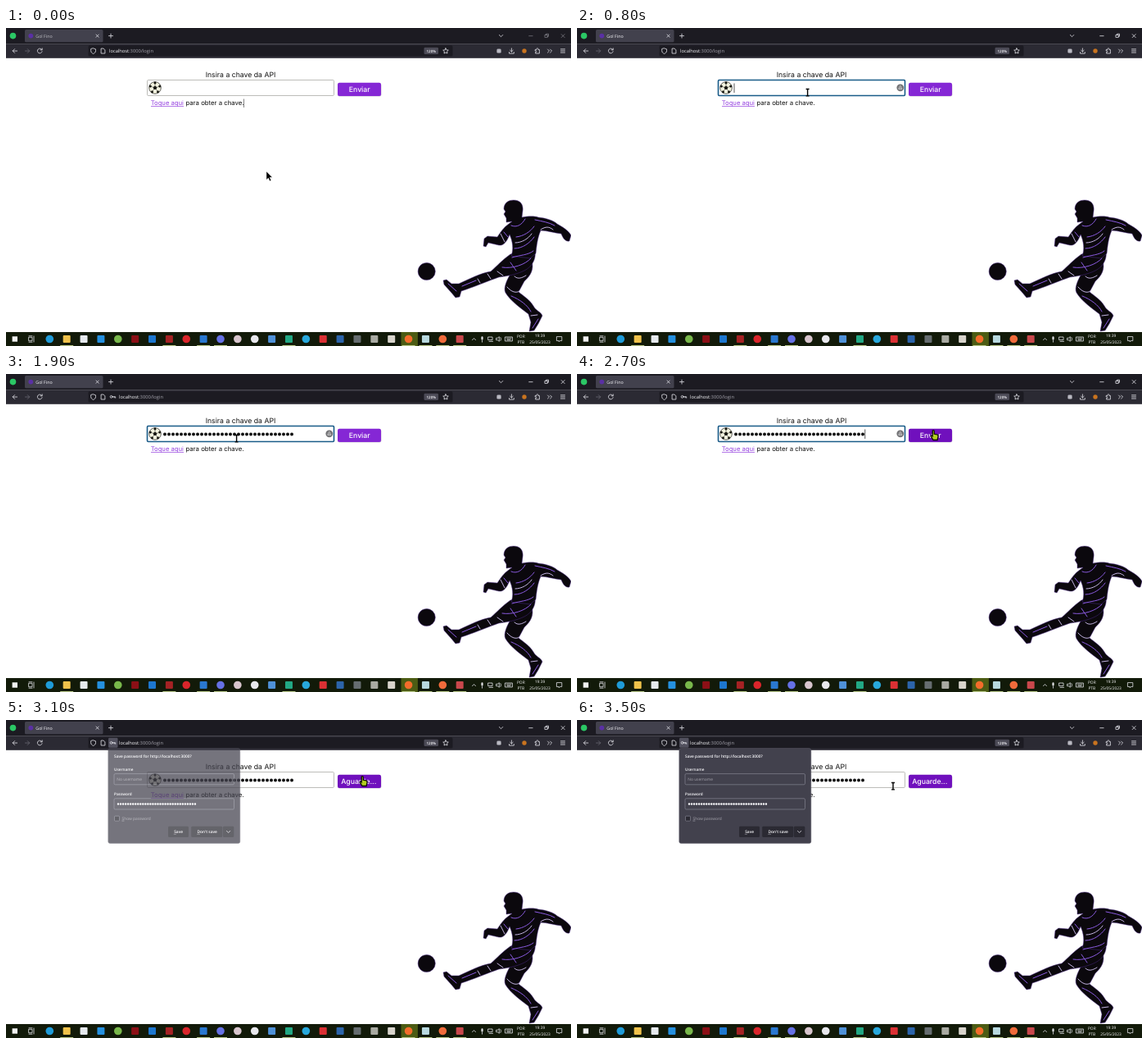
An HTML page for the animation above (3.6 s loop, 690 px wide and 388 px high).

```html
<!DOCTYPE html>
<html lang="pt">
<head>
<meta charset="utf-8">
<style>
html, body { margin: 0; width: 100%; height: 100%; overflow: hidden; background: #fff; }
svg { display: block; width: 100vw; height: 100vh; text-rendering: geometricPrecision; }
.ui { font: 4.85px "Open Sans", "Noto Sans", sans-serif; fill: #fbfbfe; }
.page { font: 8.7px Inter, sans-serif; fill: #111; }
.bold { font-weight: 600; }
.dim { fill: #a5a4ad; }
.mid { text-anchor: middle; }
.line { fill: none; stroke: #e4e4ea; stroke-width: .8; stroke-linecap: round; stroke-linejoin: round; }
.dots { fill: none; stroke-linecap: round; }
.ink { fill: #0b080d; stroke: #4a2b86; stroke-width: .5; stroke-linejoin: round; }
.accent { fill: none; stroke: #8a5ae0; stroke-width: 1; stroke-linecap: round; }
.gap { fill: none; stroke: #d9c8fa; stroke-width: .9; stroke-linecap: round; }
</style>
</head>
<body>
<svg viewBox="0 0 690 388" preserveAspectRatio="none">
  <rect width="690" height="388" fill="#fff"/>

  <!-- Page -->
  <g class="page">
    <text x="286.5" y="60.3" class="mid">Insira a chave da API</text>
    <rect id="field" x="172.5" y="63.5" width="228" height="19" rx="1.2" fill="#fff"/>
    <g id="football" transform="translate(182 73)">
      <circle r="7.3" fill="#f3f3df" stroke="#20201a" stroke-width=".7"/>
    </g>
    <path id="secret" class="dots" d="M194 73.4H349.2" stroke="#111" stroke-width="4" stroke-dasharray="0 5"/>
    <rect id="inputCaret" y="67.5" width=".8" height="11.5" fill="#333"/>
    <g id="lock">
      <circle cx="394.8" cy="72.8" r="4.4" fill="#737376"/>
      <path d="M392.9 74.7h3.8v-1.6h-3.8zM393.8 72.6v-1a1 1 0 0 1 2 0v1" fill="none" stroke="#dedede" stroke-width=".7"/>
    </g>
    <rect x="405" y="67.4" width="53.4" height="16.2" rx="2.4" fill="#45206a" opacity=".3"/>
    <rect id="button" x="405" y="66.7" width="53" height="16.2" rx="2.2"/>
    <text id="buttonText" y="77.8" style="fill:#fff;font-weight:500"/>
    <text x="176.7" y="94.2" style="font-size:7.7px;fill:#9440df">Toque aqui</text>
    <path d="M177 95.5H217" stroke="#9440df" stroke-width=".7"/>
    <text x="219.4" y="94.2" style="font-size:7.8px">para obter a chave.</text>
    <rect id="pageCaret" x="290" y="86.5" width=".8" height="10.5" fill="#666"/>
  </g>

  <!-- Player -->
  <g class="ink">
    <circle cx="513.7" cy="297" r="10.6"/>
    <path d="M642 284C645 294 641 302 633 309L626 322C632 327 640 332 644 339C647 345 653 346 655 351L650 361L645 369L639 370L641 359L638 349C630 343 616 333 610 323C607 317 612 307 616 300L620 287Z"/>
    <path d="M645 269C649 280 643 291 633 296C623 301 610 303 602 304C590 308 574 315 562 319L556 321L554 328L549 329L544 323L535 313L534 308L538 307L544 312L553 312C566 306 580 299 592 297C600 290 606 283 616 276Z"/>
    <path d="M608 221C608 213 614 210 620 210C628 210 632 215 631 223L630 231C636 230 644 229 650 231C660 232 669 235 673 239C680 243 687 247 690 253L688 260C683 261 680 256 678 251C669 250 660 247 653 247C649 256 648 266 647 275L640 281L617 278C620 270 619 261 615 252C612 260 608 266 602 265L589 262L586 267L583 266L584 257L588 254L600 255C604 249 608 243 614 239L618 236L611 237L611 232L608 227L610 224Z"/>
  </g>
  <g class="accent">
    <path d="M617 241C624 244 630 240 634 233M646 234C655 236 663 237 670 241"/>
    <path d="M608 249L613 255M623 255C632 254 640 249 645 242M621 269C631 269 640 262 645 255"/>
    <path d="M618 280C628 277 638 277 644 272M606 292C618 294 634 289 641 281M616 286L623 296"/>
    <path d="M557 315L574 308M540 312L550 321M617 327C627 331 637 338 641 346M643 366L650 355"/>
  </g>
  <path class="gap" d="M653 246C659 242 663 242 668 246M604 251L609 261M622 262C630 262 638 257 642 251M600 297L607 302M588 300L592 306M576 306L579 311M621 303C625 307 630 305 635 302M612 316C617 322 623 324 627 321M641 351L649 350"/>

  <!-- Browser -->
  <rect width="690" height="19.2" fill="#1c1b22"/>
  <rect y="19.2" width="690" height="17.6" fill="#2b2a33"/>
  <rect x="23" y="2" width="95.5" height="15.3" rx="1.6" fill="#42414d"/>
  <rect x="100.5" y="21.3" width="445" height="13.2" rx="1.6" fill="#1c1b22"/>
  <circle cx="8.5" cy="9.6" r="3.8" fill="#2bc765"/>
  <circle cx="30.3" cy="9.6" r="2.9" fill="#5a30a4"/>
  <g class="ui">
    <text id="tabTitle" x="36.3" y="11.6" style="font-size:5.3px">Gol Fino</text>
    <text id="address" y="30" style="font-size:5.75px">localhost<tspan class="dim">:3000/login</tspan></text>
    <rect x="510.5" y="23.7" width="17.5" height="8.4" rx="1.4" fill="#4b4a56"/>
    <text x="519.3" y="29.6" class="mid bold" style="font-size:4.5px">120%</text>
  </g>
  <g class="line">
    <path d="M110 8l3.2 3.2m0-3.2L110 11.2M125.5 9.6h5m-2.5-2.5v5M602.3 8.5l2.2 2.2 2.2-2.2"/>
    <path id="windowButtons" d="M638.7 9.7h4.4M658.3 8.4h3v3h-3zM659.5 8.4V7.2h3v3h-1.2M678.2 7.6l4 4m0-4l-4 4"/>
    <path d="M13.6 28H8.2l2.4-2.4M8.2 28l2.4 2.4M43.7 26.3a2.9 2.9 0 1 0 .4 2.4M44.2 24.8v2h-2"/>
    <path d="M23.5 28h5.2l-2.4-2.4M28.7 28l-2.4 2.4" style="stroke:#686771"/>
    <path d="M106.6 24.8l2.9 1v2c0 1.8-1.2 2.9-2.9 3.6-1.7-.7-2.9-1.8-2.9-3.6v-2zM116.5 25h2.6l1.8 1.8v4.2h-4.4z"/>
    <path d="M537 24.7l1 2.1 2.3.3-1.7 1.6.4 2.3-2-1.1-2 1.1.4-2.3-1.7-1.6 2.3-.3z"/>
    <path d="M617.4 24.8v4m-1.8-1.6l1.8 1.8 1.8-1.8M614.5 29.5v1.6h5.8v-1.6"/>
    <path d="M646.6 26.4h1.4c-.6-2.3 2.4-2.3 1.9 0h1.5v4.6h-4.8v-1.5c1.9.3 1.9-2 0-1.6z"/>
    <path d="M661.5 26l2 2-2 2M664.6 26l2 2-2 2M677.5 25.8h5m-5 2.1h5m-5 2.1h5"/>
  </g>
  <rect x="599.4" y="25.4" width="5.2" height="5.2" rx="1.4" fill="#b9b9c2"/>
  <circle cx="633" cy="28" r="2.7" fill="#c9741f"/>
  <rect id="keyBack" x="125" y="21.8" width="11.5" height="12" rx="1.4" fill="#52515e"/>
  <g id="key" class="line"><circle cx="128.6" cy="27.8" r="1.4"/><path d="M130 27.8h3.7v1.4M132.2 27.8v1.1"/></g>

  <!-- Password prompt -->
  <g id="prompt" class="ui">
    <rect x="124.8" y="34.6" width="161" height="116" rx="2.4" fill="#42414d" stroke="#5a5966" stroke-width=".5"/>
    <text x="132" y="46" class="bold">Save password for http://localhost:3000?</text>
    <text x="132" y="62" class="bold" style="font-size:4.7px">Username</text>
    <text x="132" y="92" class="bold" style="font-size:4.7px">Password</text>
    <g fill="#42414d" stroke="#8f8f9d" stroke-width=".6">
      <rect x="132" y="65.6" width="146.5" height="13.2" rx="1.4"/>
      <rect x="132" y="95.8" width="146.5" height="13.2" rx="1.4"/>
      <rect x="132.5" y="117.2" width="6" height="6" rx=".8" fill="#2b2a33"/>
    </g>
    <text x="135.3" y="74" class="dim">No username</text>
    <path class="dots" d="M137 102.6H231.2" stroke="#fbfbfe" stroke-width="2.5" stroke-dasharray="0 3.03"/>
    <text x="141.5" y="122" class="dim">Show password</text>
    <g fill="#2b2a33">
      <rect x="198" y="129.8" width="25" height="13.3" rx="1.4"/>
      <rect x="226.2" y="129.8" width="38" height="13.3" rx="1.4"/>
      <rect x="264.9" y="129.8" width="13.4" height="13.3" rx="1.4"/>
    </g>
    <text x="210.6" y="138.2" class="bold mid">Save</text>
    <text x="245.7" y="138.2" class="bold mid">Don't save</text>
    <path class="line" d="M205.2 139.3h2.3M233.6 139.3h3M141.8 123.1h2.2" style="stroke-width:.4"/>
    <path class="line" d="M269.5 135.4l2.1 2.1 2.1-2.1"/>
  </g>

  <!-- Taskbar -->
  <rect y="371" width="690" height="17" fill="#121a09"/>
  <rect x="482.5" y="371" width="20.4" height="17" fill="#4c5c14"/>
  <rect x="7.6" y="376.3" width="6.4" height="6.4" fill="#f2f2f2"/>
  <path class="line" d="M28 377.3h4v4.4h-4zM28 375.8h4M28 383.2h4M34 376v7"/>
  <g id="apps"></g>
  <g class="line">
    <path d="M569.5 380.6l2-2 2 2M581.5 381.2v2"/>
    <path d="M581.5 377.4v2.2" style="stroke-width:2.2"/>
    <path d="M589 377h5v3.6h-5zM590 382.4h4.5M599 378.3h1.3l2-1.6v5.6l-2-1.6H599zM604 377.6q1.4 1.9 0 3.8"/>
    <path d="M609.8 377h8.6v5h-8.6zM611.5 378.8h5.2M612 380.5h4M672.8 376.6h6v5h-2.3l-1.2 1.3v-1.3h-2.5z"/>
  </g>
  <g class="ui mid">
    <text x="628.8" y="377.6">POR</text><text x="628.8" y="385.2">PTB</text>
    <text x="652" y="377.4">19:39</text><text x="652" y="385.2">25/05/2023</text>
  </g>

  <g id="cursor">
    <path id="arrow" d="M0 0V10.2L2.4 8L4.1 11.7L5.8 10.9L4.1 7.3H7.2Z" fill="#000" stroke="#fff" stroke-width=".4"/>
    <path id="beam" d="M-2 -4.2H2M0 -4.2V4.2M-2 4.2H2" fill="none" stroke="#000" stroke-width="1.4"/>
    <path id="hand" d="M-2.2 -6C-1.2 -7 -.2 -6 -.2 -5V-1.7L3.3 -1.2C4.6 -.9 4.7 0 4.5 1.3L3.6 5.5H-1.4L-4.1 1.5C-4.7 .2 -3.3 -.4 -2.3 .8Z" fill="#b3cf20" stroke="#0c0c05" stroke-width="1.3"/>
  </g>
</svg>
<script>
const LOOP = 3600, STEP = 100;
const el = id => document.getElementById(id);
const show = (id, on) => el(id).style.display = on ? '' : 'none';
const set = (id, attrs) => { for (const k in attrs) el(id).setAttribute(k, attrs[k]); };

// Each app: shape (c = circle, s = square), colour, "+" when running
const apps = ['c#1f9bd8', 's#f0c24b+', 's#e6eaee', 's#2590df', 'c#79b84b', 's#8c1016', 's#1d77cf',
  's#a52224+', 'c#d9252b', 's#2a78d0+', 'c#6671e5+', 'c#d8c5cd', 'c#e8e8ed', 's#4f91d8',
  's#22a884+', 'c#28a8dc', 's#db3034', 's#2c64aa', 's#666d70', 's#a9aaa2', 's#d8d4cc',
  'c#f36c2b+', 's#b8d9df+', 'c#f06b3b+', 's#c9484c+'];
el('apps').innerHTML = apps.map((app, i) => {
  const x = 53.3 + i * 20.87, fill = app.slice(1, 8);
  const icon = app[0] === 'c'
    ? `<circle cx="${x}" cy="379.5" r="4.8" fill="${fill}"/>`
    : `<rect x="${x - 4.5}" y="375" width="9" height="9" rx="1" fill="${fill}"/>`;
  return icon + (app.endsWith('+') ? `<rect x="${x - 8}" y="387" width="16" height="1" fill="#b9c98a"/>` : '');
}).join('');

const polygon = (cx, cy, r, turn) => 'M' + [0, 1, 2, 3, 4].map(i => {
  const a = turn + i * Math.PI * .4;
  return `${cx + r * Math.sin(a)} ${cy - r * Math.cos(a)}`;
}).join('L') + 'Z';
let patches = polygon(0, 0, 2.5, 0), seams = '';
for (let i = 0; i < 5; i++) {
  const a = i * Math.PI * .4, s = Math.sin(a), c = -Math.cos(a);
  patches += polygon(s * 6, c * 6, 1.7, a + Math.PI);
  seams += `M${s * 2} ${c * 2}L${s * 5} ${c * 5}`;
}
el('football').innerHTML += `<path d="${patches}" fill="#171711"/><path d="${seams}" stroke="#33332b" stroke-width=".5"/>`;

// time, x, y
const route = [[0, 318, 175], [100, 318, 175], [500, 282, 79.5], [600, 281.6, 78.7], [2200, 281.6, 78.7],
  [2600, 436.5, 75], [3300, 436.5, 75], [3400, 444, 77], [3500, 386, 80.7], [LOOP, 386, 80.7]];
function pointer(t) {
  const i = route.findIndex(([end]) => end > t);
  const [t0, x0, y0] = route[i - 1], [t1, x1, y1] = route[i];
  const p = (t - t0) / (t1 - t0), k = p * p * (3 - 2 * p);
  return [x0 + (x1 - x0) * k, y0 + (y1 - y0) * k];
}

function draw(t) {
  const during = (from, to) => t >= from && t < to;
  const active = t >= 600, pasted = t >= 1900, sent = t >= 2900;
  const focused = active && !sent;

  set('tabTitle', { opacity: active ? 1 : .68 });
  set('windowButtons', { opacity: active ? 1 : .45 });
  set('address', { x: pasted ? 138 : 126 });
  show('key', pasted);
  show('keyBack', t >= 3000);

  set('field', { stroke: focused ? '#195b88' : '#adada8', 'stroke-width': focused ? 1.6 : .8 });
  show('secret', pasted);
  show('lock', during(500, 2900));
  show('pageCaret', !active);
  show('inputCaret', during(600, 1300) || during(2300, 2900));
  set('inputCaret', { x: pasted ? 351.4 : 191.6 });

  set('button', { fill: t >= 2600 ? '#7010bd' : '#8527d5' });
  el('buttonText').textContent = sent ? 'Aguarde...' : 'Enviar';
  set('buttonText', { x: sent ? 409.2 : 418.8 });

  show('prompt', t > 3000);
  set('prompt', { opacity: Math.min(1, (t - 3000) / 138) });

  const [x, y] = pointer(t);
  const onRow = y > 63 && y < 83;
  const shape = onRow && x > 405 ? 'hand' : onRow && x < 401 ? 'beam' : 'arrow';
  for (const id of ['arrow', 'beam', 'hand']) show(id, id === shape);
  set('cursor', { transform: `translate(${x} ${y})` });
}

function tick() {
  draw(Math.floor(performance.now() % LOOP / STEP) * STEP);
  requestAnimationFrame(tick);
}
tick();
</script>
</body>
</html>
```
